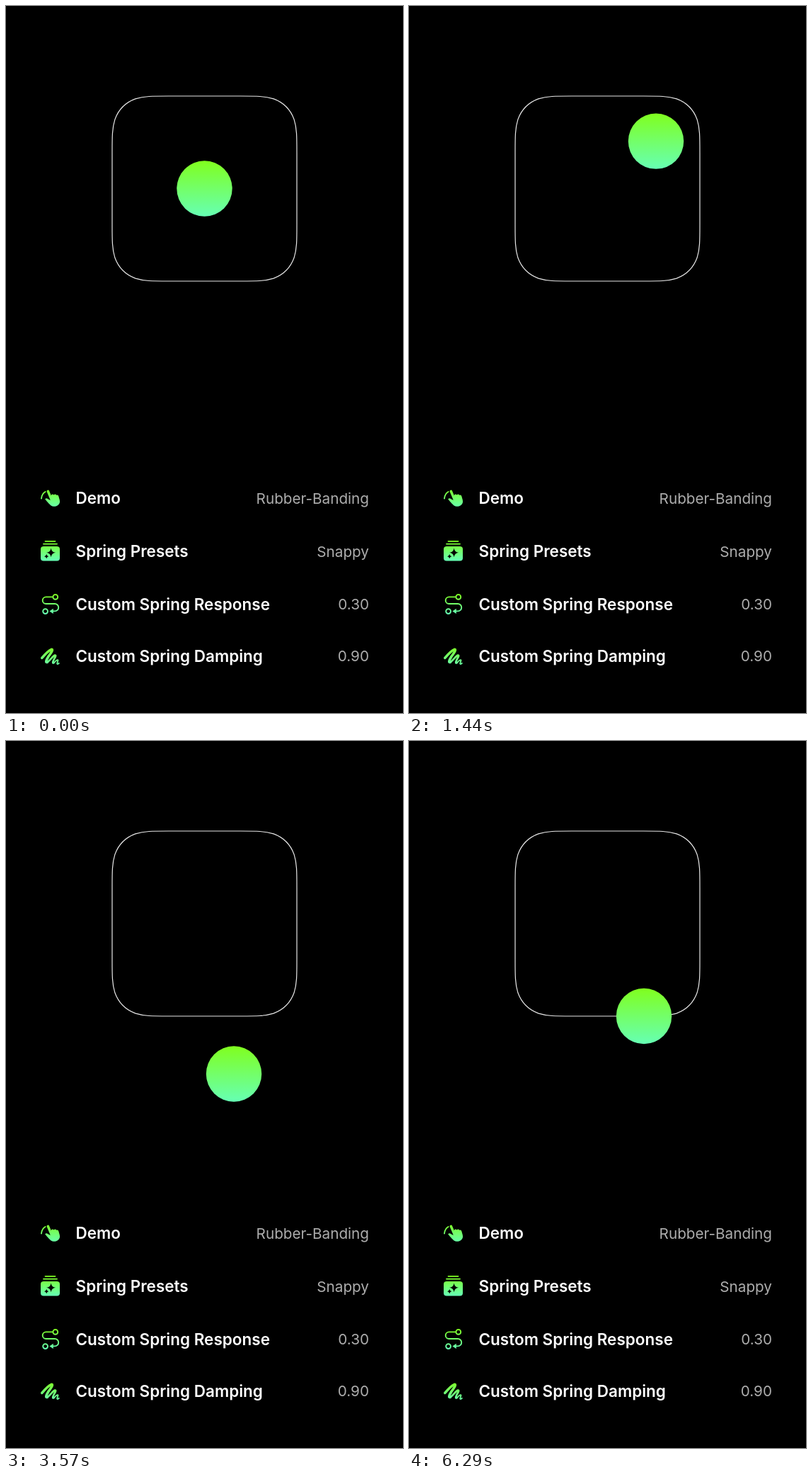
These frames come from a looping animation (561 px wide and 997 px high, 6370 ms). An HTML page:

```html
<!DOCTYPE html>
<html lang="en">
<head>
<meta charset="utf-8">
<title>Spring demo</title>
<style>
  html, body { margin: 0; width: 100%; height: 100%; overflow: hidden; background: #000; }
  svg { display: block; width: 561px; height: 997px; }
  text { font-family: Inter, "Noto Sans", sans-serif; }
  .label { font-size: 22.5px; font-weight: 600; fill: #fff; }
  .value { font-size: 20.7px; fill: #adadad; text-anchor: end; }
  .line { fill: none; stroke: url(#tint); stroke-width: 2.2; stroke-linecap: round; stroke-linejoin: round; }
  .solid { fill: url(#tint); }
</style>
</head>
<body>
<svg viewBox="0 0 561 997">
  <defs>
    <linearGradient id="green" x1="0" y1="0" x2="0" y2="1">
      <stop offset="0" stop-color="#80ff1e"/><stop offset="1" stop-color="#66ffb4"/>
    </linearGradient>
    <linearGradient id="tint" href="#green" gradientUnits="userSpaceOnUse" x1="0" y1="0" x2="0" y2="28"/>
  </defs>

  <path id="card" fill="none" stroke="#e6e6e6" stroke-width="1.2"/>
  <circle id="ball" r="39.2" fill="url(#green)"/>

  <!-- hand -->
  <g transform="translate(48 680)">
    <path class="line" style="stroke-width:1.9" d="M2 14.5Q2.6 8 7.6 5"/>
    <path class="line" style="stroke-width:3.5" d="M11.3 4.3L16.3 16"/>
    <path class="solid" d="M7.2 15.6Q8.6 13.4 11 15L14.6 17 16 9.6Q17.8 7.4 19.6 9.4Q21.6 7.2 23.2 9.8Q25.6 8.6 26.4 11.4L27.8 16.4Q29 21.4 25 24.2Q20 27.2 15.2 24.2Q12.6 22.2 7.2 15.6Z"/>
  </g>

  <!-- stack with sparkles -->
  <g transform="translate(48 754)">
    <rect class="solid" x="1" y="8" width="27" height="20.4" rx="4"/>
    <path class="line" style="stroke-width:1.8" d="M7.5 .8H21.5M5 4.6H24"/>
    <path d="M15.6 10.4Q16.4 16 22 16.8Q16.4 17.6 15.6 23.2Q14.8 17.6 9.2 16.8Q14.8 16 15.6 10.4ZM9.2 18.8Q9.7 21.8 12.6 22.2Q9.7 22.6 9.2 25.6Q8.7 22.6 5.8 22.2Q8.7 21.8 9.2 18.8Z"/>
  </g>

  <!-- winding route -->
  <g transform="translate(48 829)">
    <circle class="line" style="stroke-width:1.9" cx="21.8" cy="4.4" r="3.4"/>
    <circle class="line" style="stroke-width:1.9" cx="7.6" cy="24.6" r="3.4"/>
    <path class="line" style="stroke-width:1.9" d="M18 4.4H8.5A4.8 4.8 0 0 0 8.5 14H21A5.2 5.2 0 0 1 21 24.4H17"/>
    <path class="solid" d="M13.4 24.4L18.8 20.8V28Z"/>
  </g>

  <!-- scribble -->
  <g transform="translate(48 903)">
    <path class="line" style="stroke-width:3.6" d="M2.8 16.4C7 11.5 12 6 16.2 4.4C19.6 4 15 10 11.6 15C8.5 20 7.6 23 10.4 22.2"/>
    <path class="line" style="stroke-width:2.7" d="M10.4 22.2C14 20.5 18 13.6 21 12.6C23.8 12.2 21 16 19 20C17.6 23 18 24.4 20 23"/>
    <path class="line" style="stroke-width:1.9" d="M20 23Q24 18.4 25.4 19.2C26.4 20 23.4 23.6 24.4 24.8Q25.2 25.4 26.8 23.8"/>
  </g>

  <g class="label">
    <text x="98.5" y="702">Demo</text>
    <text x="98.5" y="777">Spring Presets</text>
    <text x="98.5" y="852">Custom Spring Response</text>
    <text x="98.5" y="925">Custom Spring Damping</text>
  </g>
  <g class="value">
    <text x="513" y="701.5">Rubber-Banding</text>
    <text x="513" y="776.5">Snappy</text>
    <text x="513" y="851">0.30</text>
    <text x="513" y="924">0.90</text>
  </g>
</svg>
<script>
  const LOOP = 6370, RELEASE = 5500, HOME = [332, 388];
  const center = [280.5, 257.5], half = 130.5, radius = 52.2;

  // Continuous-curvature corner, run once for each quarter turn
  const corner = [[1.529, 0], [1.088, 0], [.868, 0], [.631, .075], [.373, .169], [.169, .373],
                  [.075, .631], [0, .868], [0, 1.088], [0, 1.529]];
  let outline = '';
  for (let turn = 0; turn < 4; turn++) {
    const points = corner.map(([a, b]) => {
      let x = half - a * radius, y = b * radius - half;
      for (let i = 0; i < turn; i++) [x, y] = [-y, x];
      return (center[0] + x).toFixed(2) + ' ' + (center[1] + y).toFixed(2);
    });
    outline += (turn ? 'L' : 'M') + points[0] + 'C' + points.slice(1).join(' ');
  }
  document.getElementById('card').setAttribute('d', outline + 'Z');

  // Drag path: time, x, y
  const drag = [
    [80, ...center], [200, 312, 255], [330, 345, 232], [450, 333, 190], [560, 285, 174],
    [700, 213, 203], [800, 181, 262], [910, 206, 322], [1020, 274.5, 344], [1200, 362, 306],
    [1350, 383.5, 232], [1480, 325, 180], [1570, 240, 196], [1650, 200, 255], [1730, 232, 312],
    [1810, 293.5, 334], [1900, 307, 350], [2010, 310.5, 370], [2300, 311, 397],
    [2660, 311.3, 419.5], [2910, 311.5, 433.5], [3300, 317.5, 458], [3570, 322, 469.5],
    [3940, 327.5, 489], [4600, 330.5, 507.5], [4780, 331, 509.5], [5280, 335.5, 520.5],
    [RELEASE, 336, 521]
  ];

  function slope(i, axis) {
    const a = drag[i - 1], b = drag[i + 1];
    return a && b ? (b[axis] - a[axis]) / (b[0] - a[0]) : 0;
  }

  function dragAt(t, axis) {
    if (t <= drag[0][0]) return drag[0][axis];
    const i = drag.findIndex(key => key[0] >= t) - 1;
    const a = drag[i], b = drag[i + 1], span = b[0] - a[0], u = (t - a[0]) / span, v = 1 - u;
    return v * v * (1 + 2 * u) * a[axis] + u * u * (3 - 2 * u) * b[axis]
      + span * u * v * (v * slope(i, axis) - u * slope(i + 1, axis));
  }

  // Remaining share of the distance after release
  function spring(seconds, response = .3, damping = .9) {
    const omega = 2 * Math.PI / response, root = Math.sqrt(1 - damping * damping);
    const phase = omega * root * seconds;
    return Math.exp(-damping * omega * seconds) * (Math.cos(phase) + damping / root * Math.sin(phase));
  }

  const ball = document.getElementById('ball');
  function draw() {
    const t = performance.now() % LOOP;
    const rest = t > RELEASE ? spring((t - RELEASE) / 1000) : 1;
    ['cx', 'cy'].forEach((name, axis) => {
      const from = dragAt(Math.min(t, RELEASE), axis + 1);
      ball.setAttribute(name, t > RELEASE ? HOME[axis] + (from - HOME[axis]) * rest : from);
    });
    requestAnimationFrame(draw);
  }
  draw();
</script>
</body>
</html>
```
